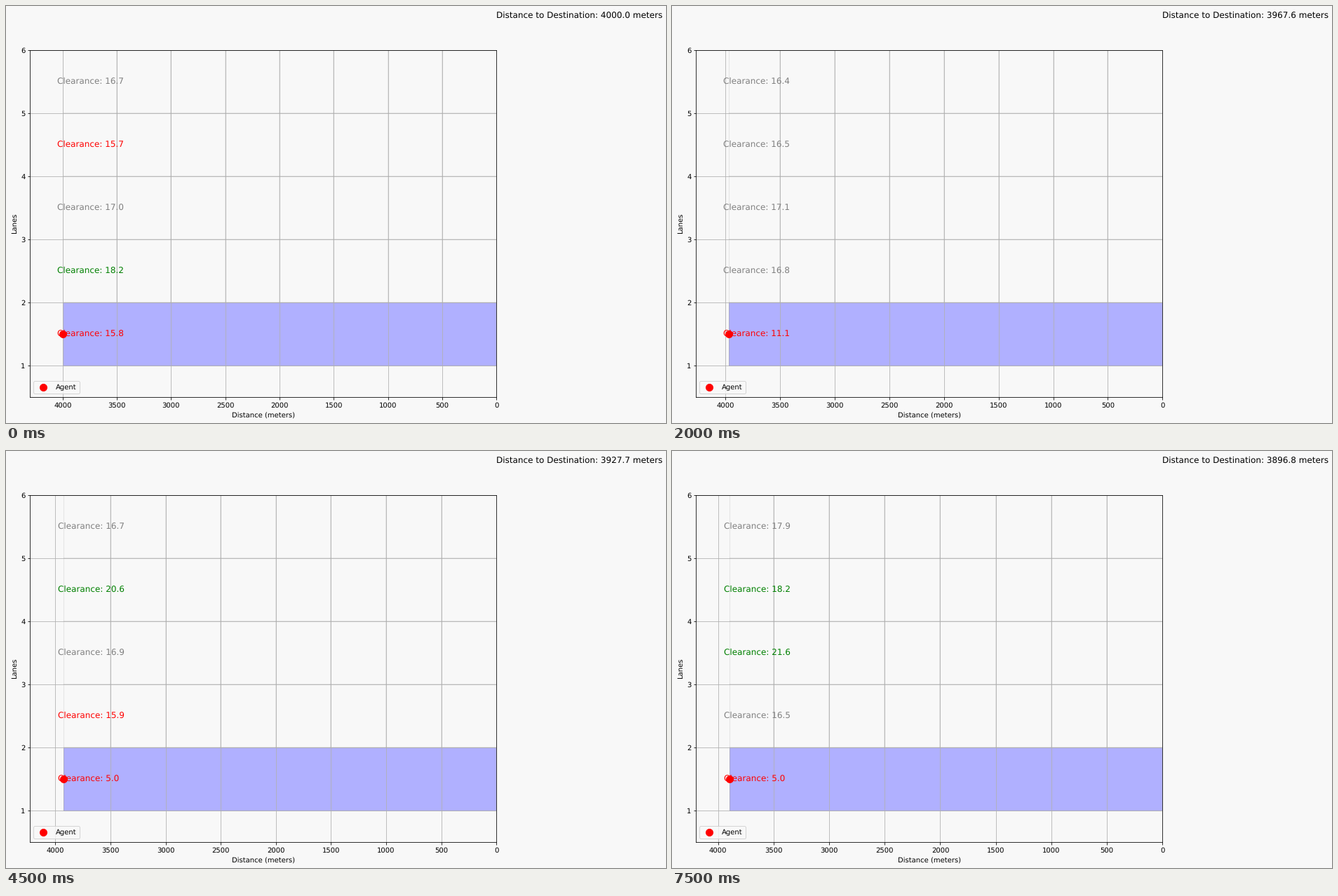
Animation of 941 by 595 pixels, one loop 8000 ms. Source, as a matplotlib script:

```python
import math

import matplotlib.pyplot as plt
import numpy as np
from matplotlib.animation import FuncAnimation
from matplotlib.patches import Rectangle

WIDTH, HEIGHT, DPI = 941, 595, 72
INTERVAL, FRAMES = 500, 16
BACKGROUND, BAND = "#f8f8f8", "#b0b0ff"
RED, GREEN, GRAY = "#ff0000", "#008000", "#808080"
AGENT_LANE = 1
LANES = range(1, 6)

plt.rcParams.update({
    "font.family": "DejaVu Sans",
    "text.hinting": "no_hinting",
    "figure.facecolor": BACKGROUND,
    "axes.facecolor": BACKGROUND,
})


def distance_left(step):
    """Cruise first, then brake behind the car ahead."""
    cruising = 10.5 * step + 0.1 * step**2
    following = np.polyval([0.003125, -0.0875, 5.7625, 61.1], step - 6)
    return 4000 - min(cruising, following)


def own_gap(step):
    if step < 1:
        return 15.8
    if step < 5:
        return 10.35 + 0.25 * step
    closing = 5.9 - 0.45 * (step - 6)
    return max(closing, 5 + 0.3 * math.sin(math.pi * (step - 8) / 6))


def clearances(step):
    """Clearance per lane; a gap opens up when a car leaves a lane."""
    return [
        own_gap(step),
        np.polyval([-0.00028, 0.00626, -0.00587, -0.49788, 18.2], step),
        17.06 - 0.0055 * (step - 3)**2 + (5.2 if step >= 14 else 0),
        23.68 - 0.39 * step if step >= 5 else 16.65 - 0.95 * 0.5**step,
        16.425 + 0.0144 * (step - 4)**2,
    ]


def clearance_color(value):
    if value > 18:
        return GREEN
    return RED if value < 16.05 else GRAY


fig = plt.figure(figsize=(WIDTH / DPI, HEIGHT / DPI), dpi=DPI)
left, bottom, width, height = 34.4, 37, 665, 495
ax = fig.add_axes([left / WIDTH, bottom / HEIGHT,
                   width / WIDTH, height / HEIGHT])
ax.set_ylim(0.5, 6)
ax.set_yticks(range(1, 7))
ax.set_xticks(range(0, 4001, 500))
ax.set_xlabel("Distance (meters)")
ax.set_ylabel("Lanes")
ax.grid(True)

# Lane outlines: shaded borders under the grid, a faint edge at the agent.
shade = dict(color="black", alpha=0.1, lw=1.5, zorder=1)
ax.vlines(range(500, 3501, 500), 2, 6, **shade)
borders = [ax.plot([0, 0], [y, y], solid_capstyle="butt", **shade)[0]
           for y in range(1, 7)]
lane_edge, = ax.plot([0, 0], [2, 6], color="black", alpha=0.08, lw=1, zorder=1)

band = ax.add_patch(Rectangle((0, AGENT_LANE), 4000, 1, fc=BAND,
                              ec=(0, 0, 0, 0.2), lw=1))
agent = ax.scatter([4000], [AGENT_LANE + 0.5], s=100, color=RED, zorder=2,
                   label="Agent")
labels = [ax.text(0, lane + 0.5, "", fontsize=12, va="center")
          for lane in LANES]
readout = ax.text(1, 1.1, "", fontsize=12, va="center",
                  transform=ax.transAxes)
ax.legend(loc="lower left")


def draw(frame):
    step = max(0, frame - 1)  # the opening pose is held for two ticks
    distance = distance_left(step)
    ax.set_xlim(distance + 300, 0)
    for border in borders:
        border.set_xdata([distance, 0])
    lane_edge.set_xdata([distance, distance])
    band.set_width(distance)
    agent.set_offsets([[distance, AGENT_LANE + 0.5]])
    for label, clearance in zip(labels, clearances(step)):
        label.set_x(distance + 50)
        label.set_text(f"Clearance: {clearance:.1f}")
        label.set_color(clearance_color(clearance))
    readout.set_text(f"Distance to Destination: {distance:.1f} meters")
    return []


animation = FuncAnimation(fig, draw, frames=FRAMES, interval=INTERVAL,
                          init_func=lambda: draw(0), repeat=True,
                          repeat_delay=0)
plt.show()
```
